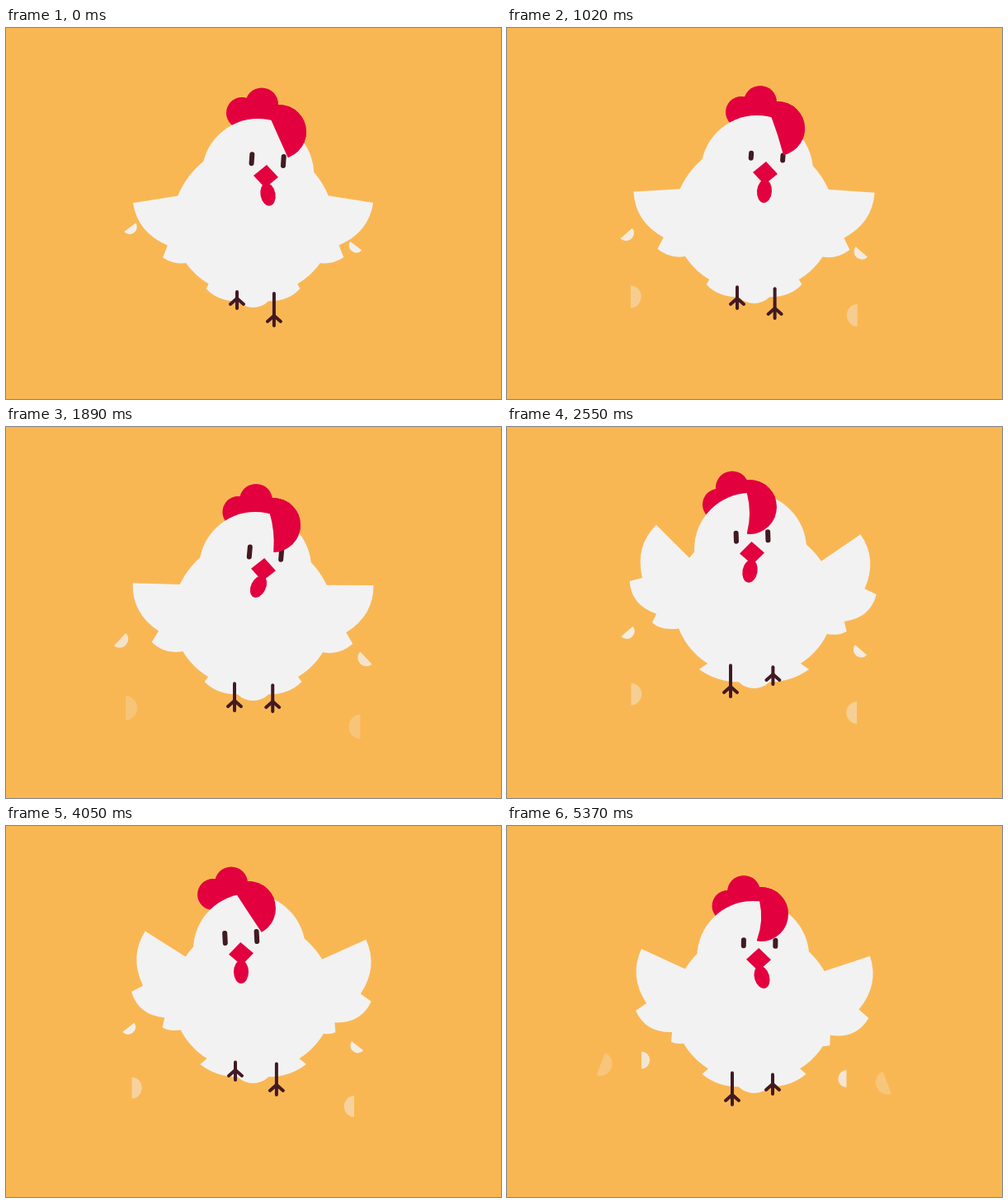
An HTML page with a canvas that plays this animation: 600 px wide and 450 px high, repeating every 5400 ms.

```html
<!DOCTYPE html>
<html lang="en">
<head>
<meta charset="utf-8">
<title>Flapping hen</title>
<style>
html, body { margin: 0; width: 100%; height: 100%; overflow: hidden; background: #f9b754; }
canvas { display: block; width: 600px; height: 450px; }
</style>
</head>
<body>
<canvas id="stage" width="600" height="450"></canvas>
<script>
const ctx = document.getElementById('stage').getContext('2d');
const LOOP = 5400, STEP = 30, HOLD = 120;
const BG = '#f9b754', WHITE = '#f2f2f2', RED = '#e2003f', DARK = '#421a22';
const MID = 299.5;
const FEATHER_CYCLE = 25.7;
const FALL_DELAY = 12.3;

// One flap lasts 9.5 steps, so poses are keyed on 19 half steps.
const CYCLE = 19;
const KEYS = [0, 3, 4, 8, 10, 11, 15];
const TRACKS = {
  base:   [339, 334, 332, 324, 317, 314, 312],
  headY:  [178, 174, 171, 159, 148, 145, 150],
  beakX:  [315, 313, 312, 305, 297, 299.5, 285],
  beakY:  [180, 176, 173, 162, 153, 149, 155],
  combX:  [331, 328, 324, 308, 294, 298, 294],
  combY:  [126, 122, 119, 107, 97, 93, 100],
  lean:   [21, 15, 5, -3, 0, 4, 31],
  lift:   [23, 20, 16, 10, 3, 5, 17],
  tilt:   [4, 4, 5, 1, -2, -3, -3],
  eye:    [17, 12, 18, 13, 16, 13, 18],
  wattle: [5, -2, -12, 8, -5, 7, 0],
  legX:   [280, 279, 277, 273, 271, 273.5, 278],
  footL:  [342, 342, 346, 340, 329, 322, 310],
  footR:  [363, 354, 347, 327, 314, 313, 328],
  wing:   [-34, -28, -23, 0, 20, 23.5, 7.5]
};

const rad = deg => deg * Math.PI / 180;
const mod = (a, b) => ((a % b) + b) % b;

// Periodic cubic through the keyed values.
function sample(values, phase) {
  const n = KEYS.length;
  const key = i => KEYS[mod(i, n)] + CYCLE * Math.floor(i / n);
  const val = i => values[mod(i, n)];
  const slope = i => (val(i + 1) - val(i)) / (key(i + 1) - key(i));
  const tangent = i => {
    const before = key(i) - key(i - 1), after = key(i + 1) - key(i);
    return (slope(i - 1) * after + slope(i) * before) / (before + after);
  };
  let i = n - 1;
  while (KEYS[i] > phase) i--;
  const h = key(i + 1) - key(i), u = (phase - key(i)) / h, v = 1 - u;
  return v * v * (1 + 2 * u) * val(i) + u * u * (1 + 2 * v) * val(i + 1)
    + h * u * v * (v * tangent(i) - u * tangent(i + 1));
}

function poseAt(step) {
  const phase = mod(2 * step, CYCLE), pose = {};
  for (const name in TRACKS) pose[name] = sample(TRACKS[name], phase);
  return pose;
}

function local(x, y, angle, draw) {
  ctx.save();
  ctx.translate(x, y);
  ctx.rotate(rad(angle));
  draw();
  ctx.restore();
}

function mirrored(axis, draw) {
  ctx.save();
  ctx.translate(2 * axis, 0);
  ctx.scale(-1, 1);
  draw();
  ctx.restore();
}

function oval(x, y, rx, ry = rx) {
  ctx.beginPath();
  ctx.ellipse(x, y, rx, ry, 0, 0, 2 * Math.PI);
  ctx.fill();
}

function stroke(...points) {
  ctx.beginPath();
  points.forEach(([x, y], i) => i ? ctx.lineTo(x, y) : ctx.moveTo(x, y));
  ctx.stroke();
}

function feather(x, y, angle, r, alpha) {
  ctx.globalAlpha = Math.max(0, Math.min(1, alpha));
  const half = () => local(x, y, angle, () => {
    ctx.beginPath();
    ctx.ellipse(0, -0.47 * r, r, 0.95 * r, 0, 0, Math.PI);
    ctx.fill();
  });
  half();
  ctx.save();
  ctx.translate(0, 22.5);
  mirrored(287.25, half);
  ctx.restore();
  ctx.globalAlpha = 1;
}

function feathers(step) {
  ctx.fillStyle = WHITE;
  const s = Math.max(1.6, mod(step, FEATHER_CYCLE));
  const bend = (s - 2.5) * (s - 7.4);
  feather(151 - 1.84 * (s - 2.5) + 0.011 * bend, 247.5 + 2.65 * (s - 2.5) - 0.02 * bend,
    -34 - 1.7 * s, 8.2 + 0.3 * s, 1.03 - 0.0375 * s);

  if (step < FALL_DELAY) return;
  const a = mod(step - FALL_DELAY, FEATHER_CYCLE);
  feather(168 - 1.28 * (a - 8.5), 284 + 4.55 * (a - 8.5), -90, 7.8 + 0.32 * a, 1.2 - 0.046 * a);
}

function wing(base, angle) {
  local(MID - 62, base - 136, angle, () => {
    ctx.beginPath();
    ctx.moveTo(30, 0);
    ctx.lineTo(-22.5, -15);
    ctx.lineTo(-74.5, -39);
    ctx.quadraticCurveTo(-90, -6, -68.5, 27);
    ctx.lineTo(-81.5, 36);
    ctx.quadraticCurveTo(-69.5, 63, -37.5, 62);
    ctx.lineTo(-38.5, 74);
    ctx.quadraticCurveTo(-25, 80, -5, 69);
    ctx.fill();
  });
}

function bodyHalf(base, spread) {
  ctx.save();
  ctx.translate(MID, base);
  ctx.beginPath();
  ctx.moveTo(1, -185);
  ctx.lineTo(-50, -185);
  ctx.bezierCurveTo(-75, -168, -97, -140, -97, -105);
  ctx.bezierCurveTo(-97, -50, -52, -14, 1, -14);
  ctx.fill();
  ctx.beginPath();
  ctx.moveTo(-20, -50);
  ctx.lineTo(-51, -34);
  ctx.lineTo(-spread, -23);
  ctx.quadraticCurveTo(-42, -6, -15, -8);
  ctx.fill();
  ctx.restore();
}

function leg(x, top, bottom) {
  const end = bottom - 2;
  stroke([x, top], [x, end]);
  stroke([x - 8, end - 5], [x, end - 12], [x + 8, end - 5]);
}

function combFront(p) {
  const x = -3 - 0.35 * p.lean, end = x + p.lean;
  const bulge = Math.max(0, 6 - 0.3 * p.lean);
  local(p.combX, p.combY, 0, () => {
    ctx.beginPath();
    ctx.moveTo(x, -60);
    ctx.lineTo(x, -16);
    ctx.quadraticCurveTo((x + end) / 2 + bulge, 8, end, 31);
    ctx.lineTo(end, 60);
    ctx.lineTo(60, 60);
    ctx.lineTo(60, -60);
    ctx.clip();
    oval(0, 0, 33);
  });
}

function face(p) {
  local(p.beakX, p.beakY, p.tilt, () => {
    ctx.strokeStyle = DARK;
    ctx.lineWidth = 6;
    ctx.lineCap = 'round';
    const h = p.eye / 2 - 3;
    stroke([-18.5, -20 - h], [-18.5, -20 + h]);
    stroke([20, -20 - h], [20, -20 + h]);
  });
  ctx.fillStyle = RED;
  combFront(p);
  local(p.beakX, p.beakY, p.tilt, () => {
    ctx.beginPath();
    ctx.moveTo(0, -14);
    ctx.lineTo(15, 0);
    ctx.lineTo(0, 14);
    ctx.lineTo(-15, 0);
    ctx.fill();
  });
  const swing = -Math.asin(p.wattle / 28) * 180 / Math.PI;
  local(p.beakX, p.beakY + 8, swing, () => oval(0, 14, 9, 14));
}

function hen(p) {
  const spread = 63 + 0.18 * p.wing;
  const headX = 295 + Math.max(0, p.base - 317) * 0.47;

  ctx.fillStyle = RED;
  oval(p.combX, p.combY, 33);
  oval(p.combX - 21, p.combY - 22 - p.lift / 2, 20);
  oval(p.combX - 37 - 0.35 * p.lift, p.combY - p.lift, 19);

  ctx.fillStyle = WHITE;
  wing(p.base, p.wing);
  bodyHalf(p.base, spread);
  mirrored(MID, () => {
    wing(p.base, 0.8 * p.wing - 6.5);
    bodyHalf(p.base, spread);
  });
  oval(MID, p.base - 26, 26);
  oval(headX, p.headY, 68);

  ctx.strokeStyle = DARK;
  ctx.lineWidth = 4;
  ctx.lineCap = 'round';
  const top = p.base - 19 - 0.9 * (spread - 57);
  leg(p.legX, top, p.footL);
  leg(p.legX + 49 + 0.12 * p.wing, top + 2, p.footR);

  face(p);
}

function draw(time) {
  const step = Math.max(0, Math.floor((time - HOLD) / STEP));
  ctx.fillStyle = BG;
  ctx.fillRect(0, 0, 600, 450);
  feathers(step);
  hen(poseAt(step));
}

let start;
function tick(now) {
  if (start === undefined) start = now;
  draw((now - start) % LOOP);
  requestAnimationFrame(tick);
}
draw(0);
requestAnimationFrame(tick);
</script>
</body>
</html>
```
